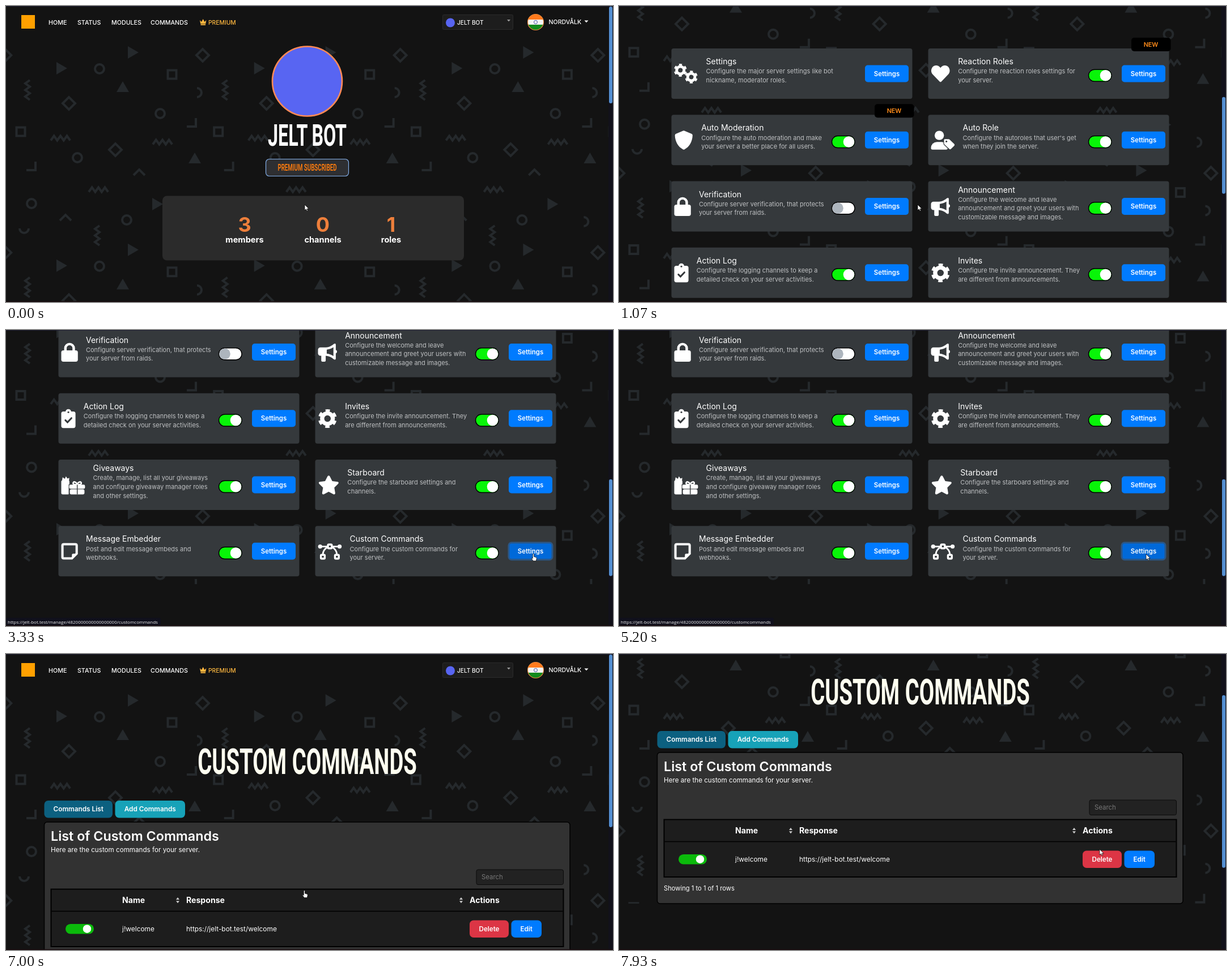
Animation of 1071 by 523 pixels, one loop 8 s. Source, as an HTML page:

```html
<!DOCTYPE html>
<html lang="en">
<head>
<meta charset="utf-8">
<title>Bot dashboard</title>
<style>
html, body { margin: 0; width: 100%; height: 100%; overflow: hidden; background: #131313; }
svg { display: block; width: 1071px; height: 523px; font-family: Inter, sans-serif; fill: #fff; }
text { white-space: pre; }
.mid { text-anchor: middle; }
.w5 { font-weight: 500; }
.w6 { font-weight: 600; }
.w7 { font-weight: 700; }
.cond { font-family: Roboto, sans-serif; font-weight: 700; text-anchor: middle; }
.line { fill: none; stroke: #25292c; stroke-width: 4; }
.solid { fill: #25292c; }
.desc { fill: #bfc1c3; }
.status { font-family: "Open Sans", sans-serif; }
</style>
</head>
<body>
<svg id="stage" viewBox="0 0 1071 523"></svg>
<script>
const CARD = '#35393c';
const BLUE = '#007bff';

const text = (x, y, s, size, cls = '', fill = '#fff') =>
  `<text x="${x}" y="${y}" font-size="${size}" class="${cls}" fill="${fill}">${s}</text>`;
const rect = (x, y, w, h, r, fill, extra = '') =>
  `<rect x="${x}" y="${y}" width="${w}" height="${h}" rx="${r}" fill="${fill}" ${extra}/>`;
const circle = (x, y, r, fill, extra = '') =>
  `<circle cx="${x}" cy="${y}" r="${r}" fill="${fill}" ${extra}/>`;
const path = (d, fill = '#fff', extra = '') => `<path d="${d}" fill="${fill}" ${extra}/>`;
const stroke = (d, width, color = '#fff') =>
  path(d, 'none', `stroke="${color}" stroke-width="${width}" stroke-linecap="round"`);
const condensed = (x, y, s, size, fill) =>
  `<g transform="translate(${x} ${y}) scale(.605 1)">${text(0, 0, s, size, 'cond', fill)}</g>`;

// Background tile of small outlined shapes
const scatter = (cls, d, ...points) => points.map(([x, y]) =>
  `<path class="${cls}" d="${d}" transform="translate(${x} ${y})"/>`).join('');
const TILE = 348.7;
const tile =
  scatter('line', 'M-8 0a8 8 0 0 1 16 0a8 8 0 0 1-16 0z', [165, 111], [272, 190], [126, 268], [45, 349], [213, 378]) +
  scatter('line', 'M-11 0 0-11 11 0 0 11z', [347, 87], [111, 172], [193, 254]) +
  scatter('line', 'M-7.5-7.5h15v15h-15z', [293, 121], [26, 222]) +
  scatter('line', 'M-17 4.500' + 'l5.7-8 5.7 8'.repeat(3), [96, 233], [276, 240], [163, 324]) +
  scatter('line', 'M4-17' + 'l-8 5.8 8 5.8'.repeat(3), [38, 148], [161, 405]) +
  scatter('line', 'M-9 6H7V-9', [328, 207], [45, 284]) +
  scatter('line', 'M-10 6 0-4 10 6', [235, 293], [105, 373]) +
  scatter('line', 'M-5-8a8 8 0 0 1 0 16', [342, 153], [327, 381]) +
  scatter('line', 'M-8-5a8 8 0 0 0 16 0', [32, 398]) +
  scatter('solid', 'M-11 9 0-10 11 9z', [206, 143], [333, 269]) +
  scatter('solid', 'M-8-11 11 0-8 11z', [223, 82], [97, 110], [266, 350]);

function backdrop(id, bottom) {
  let out = `<clipPath id="${id}"><path d="M0 66H1063V${bottom}H0z"/></clipPath><g clip-path="url(#${id})">`;
  for (let row = 0; row < 4; row++)
    for (let col = -1; col < 4; col++)
      out += `<use href="#tile" x="${col * TILE}" y="${row * TILE}"/>`;
  return out + '</g>';
}

const nav =
  rect(27, 16, 24, 24, 0, '#ffa000') +
  [[75, 'HOME'], [126, 'STATUS'], [186, 'MODULES'], [255, 'COMMANDS']]
    .map(([x, s]) => text(x, 32.5, s, 10.7, 'w5')).join('') +
  path('M342 25l3 3 2.700-5 2.700 5 3-3-1.200 6.500h-9z M343.500 32.300h8.500v1.700h-8.500z', '#ffb83f') +
  text(357, 32.5, 'PREMIUM', 10.3, 'w5', '#ffb83f') +
  rect(770.5, 15.5, 124, 26, 2, '#1d1d1d', 'stroke="#2b2b2b"') +
  circle(784, 29.5, 8, '#5865f2') + text(796, 33, 'JELT BOT', 10.1, 'w5') +
  path('M884 24h6l-3 3.500z', '#999') +
  '<clipPath id="face"><circle cx="934.5" cy="28.500" r="14"/></clipPath><g clip-path="url(#face)">' +
  rect(920, 14, 30, 10, 0, '#ff7a1c') + rect(920, 24, 30, 9, 0, '#f4f4f4') + rect(920, 33, 30, 10, 0, '#128a1c') +
  '</g>' + circle(934.5, 28.5, 3, 'none', 'stroke="#3b49a0"') +
  circle(934.5, 28.5, 14, 'none', 'stroke="#e8883c" stroke-width="1.2"') +
  text(957.5, 31.5, 'NORDVÅLK', 10.6, 'w5') + path('M1020.500 25.500h7l-3.500 3.700z');

// Icons on a 512 unit high grid
const gear = (x, y, r) => `<g transform="translate(${x} ${y}) rotate(15)" stroke="#fff">` +
  circle(0, 0, r * .57, 'none', `stroke-width="${r * .44}"`) +
  circle(0, 0, r * .86, 'none', `stroke-width="${r * .28}" pathLength="12" stroke-dasharray="1 1"`) + '</g>';
const box = (x, y) => rect(x - 52, y - 52, 104, 104, 24, 'none', 'stroke="#fff" stroke-width="52"');
const icons = {
  gears: [640, gear(165, 160, 175) + gear(460, 345, 172)],
  heart: [512, path('M256 96C200 10 90 10 40 76C-10 145 0 220 45 272L232 468q24 24 48 0L467 272C512 220 522 145 472 76C422 10 312 10 256 96z')],
  shield: [512, path('M238 4q18-7 36 0L464 84q30 12 30 44C490 300 400 450 274 507q-18 8-36 0C112 450 22 300 18 128q0-32 30-44z')],
  user: [640, circle(224, 128, 126, '#fff') +
    path('M0 464a160 160 0 0 1 160-160h130a160 160 0 0 1 160 160v8q0 40-40 40H40q-40 0-40-40z') +
    path('M352 250q0-22 22-22h100q16 0 28 12L626 360q24 24 0 48l-86 86q-24 24-48 0L364 372q-12-12-12-28z', '#fff',
      `stroke="${CARD}" stroke-width="36" paint-order="stroke"`) + circle(415, 292, 24, CARD)],
  lock: [448, rect(0, 208, 448, 304, 56, '#fff') + stroke('M112 230v-84a112 110 0 0 1 224 0v84', 68)],
  horn: [512, path('M0 192a64 64 0 0 1 64-64h110c110 0 190-40 246-90q60-40 60 20v364q0 60-60 20c-50-45-120-82-212-90v128q0 32-32 32h-56q-32 0-32-32V352H64a64 64 0 0 1-64-64z') +
    path('M236 186c70-8 130-30 180-64v236c-50-34-110-56-180-64z', CARD) + circle(468, 240, 44, '#fff')],
  clip: [384, rect(0, 64, 384, 448, 56, '#fff') + circle(192, 76, 76, '#fff') + circle(192, 84, 24, CARD) +
    stroke('M112 300l56 56 106-112', 46, CARD)],
  gear: [512, gear(256, 256, 252)],
  gifts: [640, rect(0, 130, 220, 382, 40, '#fff') + path('M20 150L36 50l62 40 28-66 40 62 50-22-10 100z') +
    path('M200 240h440v272H200z', CARD) + stroke('M430 250c-20-90-120-100-110-30q8 30 110 30c20-90 120-100 110-30q-8 30-110 30', 40) +
    rect(216, 250, 424, 108, 34, '#fff') + rect(232, 376, 394, 136, 40, '#fff') + rect(420, 250, 22, 262, 0, CARD)],
  star: [576, path('M258 22q30-36 60 0l66 130 146 20q42 14 14 54L440 330l25 146q-4 44-48 32L288 440 159 508q-44 12-48-32l25-146L32 226q-28-40 14-54l146-20z')],
  note: [448, path('M32 100v312q0 36 36 36h220l128-128V100q0-36-36-36H68q-36 0-36 36z', 'none', 'stroke="#fff" stroke-width="62"') +
    path('M288 448v-96q0-32 32-32h96z')],
  curve: [640, stroke('M60 128H580', 44) + circle(58, 128, 56, '#fff') + circle(582, 128, 56, '#fff') +
    stroke('M262 140C170 190 134 260 130 340M378 140C470 190 506 260 510 340', 44) +
    path('M256 64h128v128H256z', CARD) + box(320, 124) + box(130, 404) + box(510, 404)]
};

const modules = [
  ['gears', 'Settings', 'Configure the major server settings like bot|nickname, moderator roles.', null],
  ['heart', 'Reaction Roles', 'Configure the reaction roles settings for|your server.', true, 'new'],
  ['shield', 'Auto Moderation', 'Configure the auto moderation and make|your server a better place for all users.', true, 'new'],
  ['user', 'Auto Role', "Configure the autoroles that user's get|when they join the server.", true],
  ['lock', 'Verification', 'Configure server verification, that protects|your server from raids.', false],
  ['horn', 'Announcement', 'Configure the welcome and leave|announcement and greet your users with|customizable message and images.', true],
  ['clip', 'Action Log', 'Configure the logging channels to keep a|detailed check on your server activities.', true],
  ['gear', 'Invites', 'Configure the invite announcement. They|are different from announcements.', true],
  ['gifts', 'Giveaways', 'Create, manage, list all your giveaways|and configure giveaway manager roles|and other settings.', true],
  ['star', 'Starboard', 'Configure the starboard settings and|channels.', true],
  ['note', 'Message Embedder', 'Post and edit message embeds and|webhooks.', true],
  ['curve', 'Custom Commands', 'Configure the custom commands for|your server.', true]
];

function moduleCard([icon, title, desc, on, badge], i) {
  const [unitWidth, art] = icons[icon], scale = .0654;
  const lines = desc.split('|'), left = 19.2 + unitWidth * scale, top = lines.length > 2 ? 20 : 28;
  return `<g transform="translate(${92.5 + 453 * (i % 2)} ${564 + 117.25 * (i >> 1)})">` +
    rect(0, 0, 425, 89, 4, CARD) +
    `<g transform="translate(5 28) scale(${scale})">${art}</g>` +
    text(left, top, title, 14) +
    lines.map((s, k) => text(left, top + 16.3 + 15.6 * k, s, 11, 'desc', '#bfc1c3')).join('') +
    (on === null ? '' : rect(283, 37.3, 40.5, 21, 10.5, on ? '#08f508' : '#fff', 'stroke="#000" stroke-width="1.4"') +
      circle(on ? 313 : 293.5, 47.8, 9.8, on ? '#fff' : '#adb5bd')) +
    rect(341.5, 29.5, 77, 30, 5, BLUE, `id="button${i}"`) + text(380, 48.7, 'Settings', 11.4, 'mid w6') +
    (badge ? rect(358.5, -19, 69.5, 24, 5, '#000') + text(393, -3, 'NEW', 10.8, 'mid w6', '#ff8c1a') : '') + '</g>';
}

const stat = (x, n, label) => text(x, 399, n, 36, 'mid w7', '#ee7f3b') + text(x, 418, label, 14.6, 'mid w7');
const dashboard = backdrop('area1', 1253) + '<use href="#nav"/>' +
  circle(531.5, 133, 61.5, '#5865f2', 'stroke="#ff8a55" stroke-width="2.6"') +
  condensed(531.5, 247, 'JELT BOT', 53.4, '#fff') +
  rect(458.5, 270.5, 146, 30, 6, '#2e2f32', 'stroke="#82aee8" stroke-width="1.2"') +
  condensed(531.5, 290.7, 'PREMIUM SUBSCRIBED', 16, '#f5780f') +
  rect(276, 335.5, 532, 114, 8, '#2b2b2b') +
  stat(421, 3, 'members') + stat(559, 0, 'channels') + stat(679.5, 1, 'roles') +
  modules.map(moduleCard).join('');

const button = (x, y, w, fill, s, size) => rect(x, y, w, 30.5, 7, fill) + text(x + w / 2, y + 19.3, s, size, 'mid w6');
const sorter = x => path(`M${x - 3} 434l3-4 3 4zm0 2.200l3 4 3-4z`, '#ccc');
const commands = backdrop('area2', 564) + '<use href="#nav"/>' +
  condensed(531.5, 212, 'CUSTOM COMMANDS', 63.3, '#fffff0') +
  button(67.5, 259, 120.5, '#0c6080', 'Commands List', 11.8) +
  button(192.5, 259, 123.5, '#17a2b8', 'Add Commands', 11.8) +
  rect(67.5, 297, 927.5, 267, 5, '#323232', 'stroke="#000" stroke-width="1.5"') +
  text(79, 330, 'List of Custom Commands', 23.3, 'w6') +
  text(79, 349.5, 'Here are the custom commands for your server.', 11.65) +
  rect(830, 381, 153.5, 26.5, 3, '#222', 'stroke="#0a0a0a"') + text(839, 398, 'Search', 11.4, '', '#777') +
  rect(79.5, 415.5, 904, 101.5, 0, '#1d1d1d', 'stroke="#000" stroke-width="2"') +
  rect(80.5, 453.7, 902, 1.6, 0, '#000') +
  text(205, 439.5, 'Name', 14.1, 'w7') + text(318, 439.5, 'Response', 14.1, 'w7') + text(818, 439.5, 'Actions', 14.1, 'w7') +
  sorter(303) + sorter(803) +
  rect(105, 477, 50, 17.5, 8.7, '#0bba0b') + circle(143, 485.7, 7.2, '#fff') +
  text(205, 489.7, 'j!welcome', 11.9) + text(318, 489.7, 'https://jelt-bot.test/welcome', 11.9) +
  button(818, 470.5, 69, '#dc3545', 'Delete', 11.6) + button(891.5, 470.5, 53.5, BLUE, 'Edit', 11.6) +
  text(79, 540.5, 'Showing 1 to 1 of 1 rows', 11.2);

const $ = id => document.getElementById(id);
$('stage').innerHTML =
  `<defs><g id="tile">${tile}</g><g id="nav">${nav}</g></defs>` + rect(0, 0, 1071, 523, 0, '#131313') +
  `<g id="dashboard">${dashboard}</g><g id="commands">${commands}</g>` +
  `<g id="status">${rect(0, 508.5, 273, 14.5, 2, '#10101c')}${text(3, 518.7,
    'https://jelt-bot.test/manage/4820000000000000000/customcommands', 8, 'status', '#eee')}</g>` +
  `<g id="bar">${rect(1063, 0, 8, 523, 0, '#12111a')}<rect id="thumb" x="1064" width="6" rx="3" fill="#5590d2"/></g>` +
  rect(0, 0, 1071, 1, 0, '#1c1c30') + rect(0, 521.5, 1071, 1.5, 0, '#190c0f') +
  `<g id="cursor" stroke="#000" stroke-width=".7" stroke-linejoin="round">
    <path id="arrow" d="M0 0V10L2.400 7.900 4 11.300 5.600 10.600 4.100 7.300H7.300z"/>
    <path id="hand" d="M-.700 0q1.100-1.700 2.200 0V4.500l3.600 1q1.400.500 1.200 2L5.400 12H.2L-2.700 8q-.300-1.500 1-1l1 .800z"/></g>`;

// Times below are in ticks of 1/15 s
const dashScroll = [[14, 0], [15, 270], [16, 489], [17, 489], [18, 536], [25, 536], [26, 781], [27, 798], [28, 804]];
const listScroll = [[105, 0], [106, 25], [107, 62], [109, 108], [111, 123]];
const pointer = [[0, 527, 351], [3, 300, 425], [5, 281, 200], [7, 480, 26], [9, 796, 120], [11, 700, 380], [13, 527, 351],
  [31, 527, 351], [34, 640, 362], [38, 860, 388], [41, 922, 402], [42, 922, 402], [50, 930, 396],
  [88, 930, 396], [94, 760, 360], [101, 540, 415], [103, 526, 419], [113, 526, 417],
  [114, 570, 405], [116, 740, 330], [117, 800, 326], [119, 848, 345]];

function sample(keys, n) {
  const next = keys.findIndex(k => k[0] > n);
  if (next === 0) return keys[0].slice(1);
  if (next < 0) return keys[keys.length - 1].slice(1);
  const a = keys[next - 1], b = keys[next], f = (n - a[0]) / (b[0] - a[0]);
  return a.slice(1).map((v, i) => v + (b[i + 1] - v) * f);
}
const show = (id, on) => $(id).setAttribute('display', on ? 'inline' : 'none');
const set = (id, attrs) => { for (const k in attrs) $(id).setAttribute(k, attrs[k]); };

function draw(ms) {
  const n = Math.floor((ms % 8000 + 4) * 15 / 1000) % 120;
  const first = n < 81, second = n >= 89;
  const [scroll] = sample(first ? dashScroll : listScroll, n);
  const pageHeight = first ? 1600 : 897;
  show('dashboard', first);
  show('commands', second);
  show('bar', first || second);
  show('status', n >= 43 && first);
  set(first ? 'dashboard' : 'commands', { transform: `translate(0 ${-scroll})` });
  set('thumb', { y: 1 + scroll * 523 / pageHeight, height: 523 * 523 / pageHeight });

  const hover = n >= 40 && first;
  set('button11', { fill: hover ? '#0069d9' : BLUE, stroke: n >= 43 ? '#2b5787' : 'none', 'stroke-width': 3 });

  const hand = (n >= 40 && n < 78) || (n >= 101 && n < 106);
  const [x, y] = sample(pointer, n);
  set('cursor', { transform: `translate(${x} ${y})` });
  show('hand', hand);
  show('arrow', !hand);
}

const start = performance.now();
(function loop() {
  draw(performance.now() - start);
  requestAnimationFrame(loop);
})();
</script>
</body>
</html>
```
